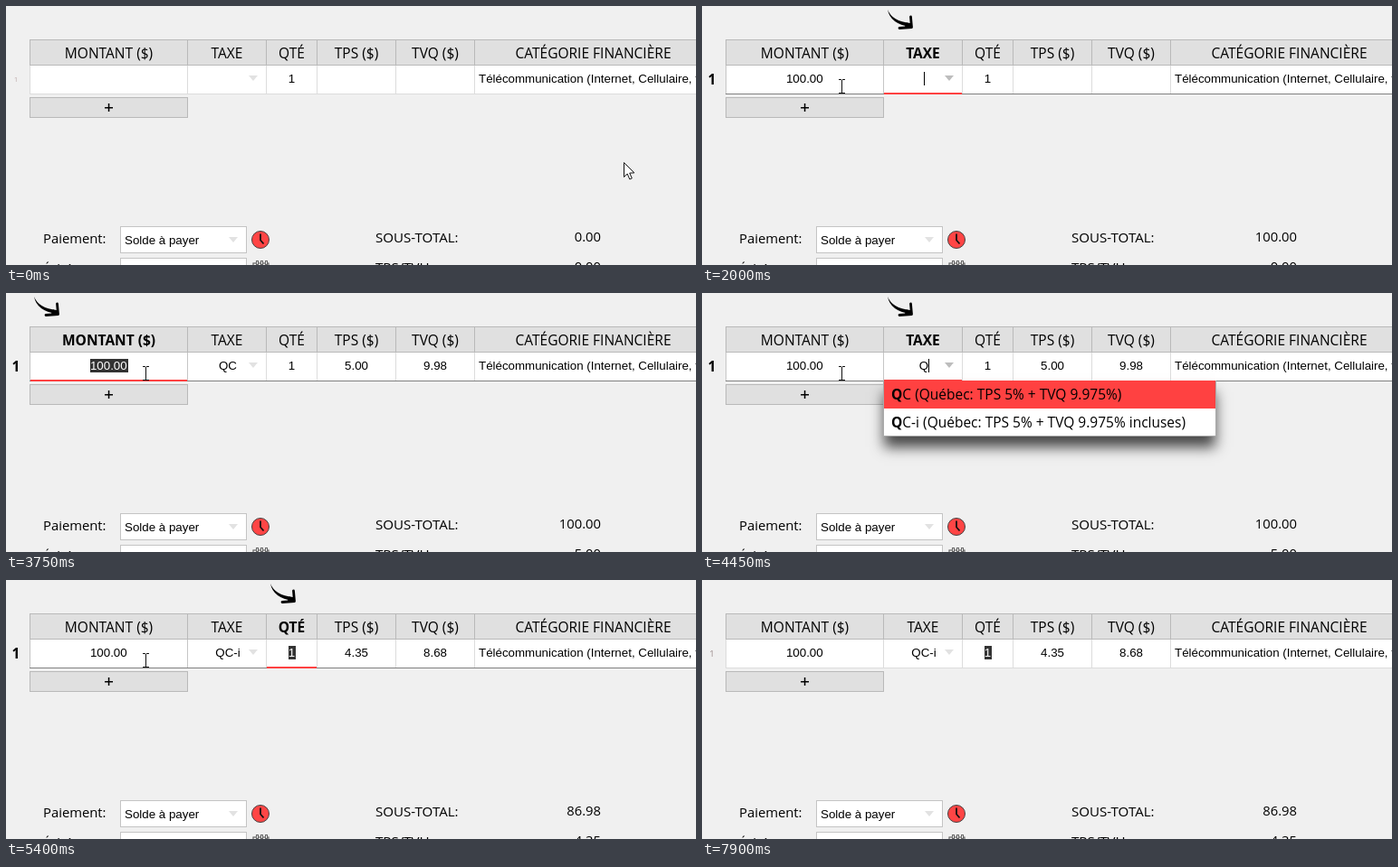
Animation, 762 px wide and 287 px high, one loop 7950 ms. Source, as an HTML page with a canvas:

```html
<!DOCTYPE html>
<html lang="fr">
<head>
<meta charset="utf-8">
<style>
html, body { margin: 0; width: 762px; height: 287px; overflow: hidden; background: #f0f0f0; }
canvas { display: block; }
</style>
</head>
<body>
<canvas id="stage" width="762" height="287"></canvas>
<script>
const ctx = document.getElementById('stage').getContext('2d');
const LOOP = 7950, STEP = 50;
const UI = '"Open Sans", "Noto Sans", sans-serif';
const INPUT = '13.333px "Liberation Sans", Arial, sans-serif';
const RED = '#ff4141', LINE = '#b9b9b9', PALE = '#dcdcdc';

const columns = [
  { title: 'MONTANT ($)', x: 26, end: 200 },
  { title: 'TAXE', x: 200, end: 287 },
  { title: 'QTÉ', x: 287, end: 343 },
  { title: 'TPS ($)', x: 343, end: 430 },
  { title: 'TVQ ($)', x: 430, end: 517 },
  { title: 'CATÉGORIE FINANCIÈRE', x: 517, end: 779 }
];

// Each entry overrides the state from its time on.
const timeline = [
  [0, { amount: '', tax: '', tps: '', tvq: '', subtotal: '0.00', taxTotal: '0.00', focus: -1 }],
  [600, { focus: 0, caret: true }],
  [1100, { caret: false }],
  [1300, { amount: '1', caret: true }],
  [1600, { amount: '10' }],
  [1700, { amount: '100' }],
  [2000, { amount: '100.00', subtotal: '100.00', focus: 1 }],
  [2250, { tax: 'Q', list: 1 }],
  [2600, { tax: 'QC', list: 0, tps: '5.00', tvq: '9.98', taxTotal: '5.00', focus: 2, selected: 2, caret: false }],
  [3750, { focus: 0, selected: 0 }],
  [4100, { focus: 1, selected: 1 }],
  [4450, { tax: 'Q', list: 1, selected: -1, caret: true }],
  [4950, { caret: false }],
  [5000, { list: 2 }],
  [5400, { tax: 'QC-i', list: 0, tps: '4.35', tvq: '8.68', subtotal: '86.98', taxTotal: '4.35', focus: 2, selected: 2 }],
  [7800, { focus: -1 }]
];

const clamp = v => Math.max(0, Math.min(1, v));
const mix = (a, b, p) => a + (b - a) * p;
const smooth = p => p * p * (3 - 2 * p);
const ui = (size, weight = 400) => `${weight} ${size}px ${UI}`;

function stateAt(t) {
  const state = { selected: -1, list: 0, caret: false };
  for (const [time, change] of timeline) if (t >= time) Object.assign(state, change);
  return state;
}

function rect(x, y, w, h, fill) {
  ctx.fillStyle = fill;
  ctx.fillRect(x, y, w, h);
}

function box(x, y, w, h, fill, border) {
  rect(x, y, w, h, border);
  rect(x + 1, y + 1, w - 2, h - 2, fill);
}

function text(str, x, y, font, align = 'left', color = '#000') {
  ctx.font = font;
  ctx.textAlign = align;
  ctx.fillStyle = color;
  ctx.fillText(str, x, y);
}

function poly(points, fill, stroke, width = 1, close = true) {
  ctx.beginPath();
  points.forEach(([x, y]) => ctx.lineTo(x, y));
  if (close) ctx.closePath();
  if (fill) { ctx.fillStyle = fill; ctx.fill(); }
  if (stroke) { ctx.strokeStyle = stroke; ctx.lineWidth = width; ctx.stroke(); }
}

function triangle(x, y, color) {
  poly([[x - 5, y], [x + 5, y], [x, y + 6]], color);
}

function field(index, value, center, state) {
  ctx.font = INPUT;
  const width = ctx.measureText(value).width;
  const selected = state.selected === index;
  if (selected) rect(Math.round(center - width / 2), 73, Math.round(width) + 1, 15, '#333');
  text(value, center, 85, INPUT, 'center', selected ? '#fff' : '#000');
  if (state.focus === index && state.caret && !selected) {
    rect(Math.floor(center + width / 2), 73, 1, 15, '#000');
  }
}

function hint(x) {
  ctx.save();
  ctx.translate(x, 0);
  ctx.lineJoin = ctx.lineCap = 'round';
  ctx.fillStyle = '#000';
  ctx.beginPath();
  ctx.moveTo(4, 4);
  ctx.quadraticCurveTo(9, 17, 29, 19);
  ctx.lineTo(29, 23);
  ctx.quadraticCurveTo(7, 20, 4, 4);
  ctx.fill();
  poly([[29.5, 12], [30.5, 23.5], [17, 24.5]], null, '#000', 2.8, false);
  poly([[25, 18], [31, 24], [23, 23]], '#000');
  ctx.restore();
}

function rowNumber(t) {
  const ease = p => 1 - (1 - p) ** 2.4;
  const active = t < 7800 ? ease(clamp((t - 550) / 150)) : 1 - ease(clamp((t - 7800) / 200));
  const bold = t >= 600 && t < 7800;
  const gray = mix(190, 0, active);
  const size = mix(8, 15.5, active);
  text('1', 11, 81.5 + size * 0.357, ui(size, bold ? 700 : 400), 'center',
    `rgb(${gray},${gray * 0.9},${gray * 0.9})`);
}

function table(state, t, hover) {
  columns.forEach(({ title, x, end }, i) => {
    const focused = state.focus === i;
    const center = (x + end + 1) / 2;
    box(x, 37, end - x + 1, 29, '#e0e0e0', LINE);
    box(x, 65, end - x + 1, 33, '#fff', PALE);
    text(title, center, 58, ui(15.5, focused ? 700 : 400), 'center');
  });
  if (hover) box(26, 65, 175, 33, '#fff', '#c6c6c6');
  rect(26, 65, 736, 1, LINE);
  if (state.focus >= 0) {
    const { x, end } = columns[state.focus];
    rect(26, 97, 736, 1, '#808080');
    rect(x + 1, 96, end - x - 1, 2, RED);
    hint(x + 1);
  }
  triangle(273, 77, state.focus === 1 ? '#bdbdbd' : '#e2e2e2');
  field(0, state.amount, 113.3, state);
  field(1, state.tax, 245, state);
  field(2, '1', 315.5, state);
  field(3, state.tps, 387, state);
  field(4, state.tvq, 474, state);
  text('Télécommunication (Internet, Cellulaire, t', 522, 85, INPUT);
  rowNumber(t);

  box(26, 101, 175, 23, '#e0e0e0', LINE);
  rect(109, 112, 9, 1.5, '#000');
  rect(112.8, 108, 1.5, 9, '#000');
}

function clock() {
  ctx.beginPath();
  ctx.arc(281, 259, 9.5, 0, Math.PI * 2);
  ctx.fillStyle = '#ff4545';
  ctx.fill();
  ctx.strokeStyle = '#444';
  ctx.lineWidth = 1;
  ctx.stroke();
  poly([[281, 252.5], [281, 259.5], [284.5, 263.5]], null, '#111', 1.8, false);
}

function calendar() {
  ctx.strokeStyle = '#666';
  ctx.lineWidth = 1.2;
  ctx.strokeRect(273, 285, 17, 14);
  for (const x of [276, 281, 286]) box(x, 282, 3, 5, '#f0f0f0', '#666');
}

function footer(state) {
  text('Paiement:', 41, 263, ui(14.8));
  text('Échéance:', 41, 297, ui(14.8));
  for (const y of [244, 279]) box(126, y, 140, 30, '#fff', '#c4c4c4');
  text('Solde à payer', 131, 264, INPUT);
  triangle(251, 256, '#e2e2e2');
  clock();
  calendar();
  text('SOUS-TOTAL:', 408, 262, ui(15.1));
  text('TPS/TVH:', 408, 295, ui(15.1));
  text(state.subtotal, 657, 261, ui(14.8), 'right');
  text(state.taxTotal, 657, 294, ui(14.8), 'right');
}

function dropdown(highlight) {
  ctx.save();
  ctx.shadowColor = 'rgba(0,0,0,.7)';
  ctx.shadowBlur = 14;
  ctx.shadowOffsetY = 13;
  rect(201, 97, 366, 61, '#fff');
  ctx.restore();
  box(200, 97, 368, 62, '#fff', '#aaa');
  rect(201, highlight === 1 ? 97 : 128, 366, highlight === 1 ? 31 : 30, RED);
  const options = ['C (Québec: TPS 5% + TVQ 9.975%)', 'C-i (Québec: TPS 5% + TVQ 9.975% incluses)'];
  options.forEach((rest, i) => {
    const y = 118 + i * 31;
    text('Q', 209, y, ui(15.5, 700));
    const offset = ctx.measureText('Q').width;
    text(rest, 209 + offset, y, ui(15.5));
  });
}

function pointer(x, y) {
  const shape = [[0, 0], [0, 16], [3.7, 12.5], [6.3, 18.5], [8.8, 17.4], [6.2, 11.6], [11.3, 11.4]];
  poly(shape.map(([dx, dy]) => [x + dx + 0.5, y + dy + 0.5]), '#fff', '#111');
}

function iBeam(x, y) {
  x = Math.round(x);
  y = Math.round(y);
  rect(x, y - 7, 1, 15, '#111');
  for (const dy of [-8, 7]) {
    rect(x - 3, y + dy, 3, 1, '#111');
    rect(x + 1, y + dy, 3, 1, '#111');
  }
}

function mouseAt(t) {
  if (t >= 7050) {
    const p = clamp((t - 7050) / 550);
    const eased = mix(p, smooth(p), 0.6);
    return [mix(146, 128, eased), mix(106, 290, eased)];
  }
  if (t >= 850) return [154, 89];
  const p = smooth(clamp(t / 700));
  return [mix(682, 154, p), mix(173, 87, p)];
}

function draw(t) {
  const state = stateAt(t);
  const [x, y] = mouseAt(t);
  const overRow = y > 66 && y < 98;
  rect(0, 0, 762, 287, '#f0f0f0');
  table(state, t, overRow && x < 201);
  footer(state);
  if (state.list) dropdown(state.list);
  (overRow ? iBeam : pointer)(x, y);
}

function frame(now) {
  draw(Math.floor((now % LOOP) / STEP) * STEP);
  requestAnimationFrame(frame);
}
draw(0);
requestAnimationFrame(frame);
</script>
</body>
</html>
```
